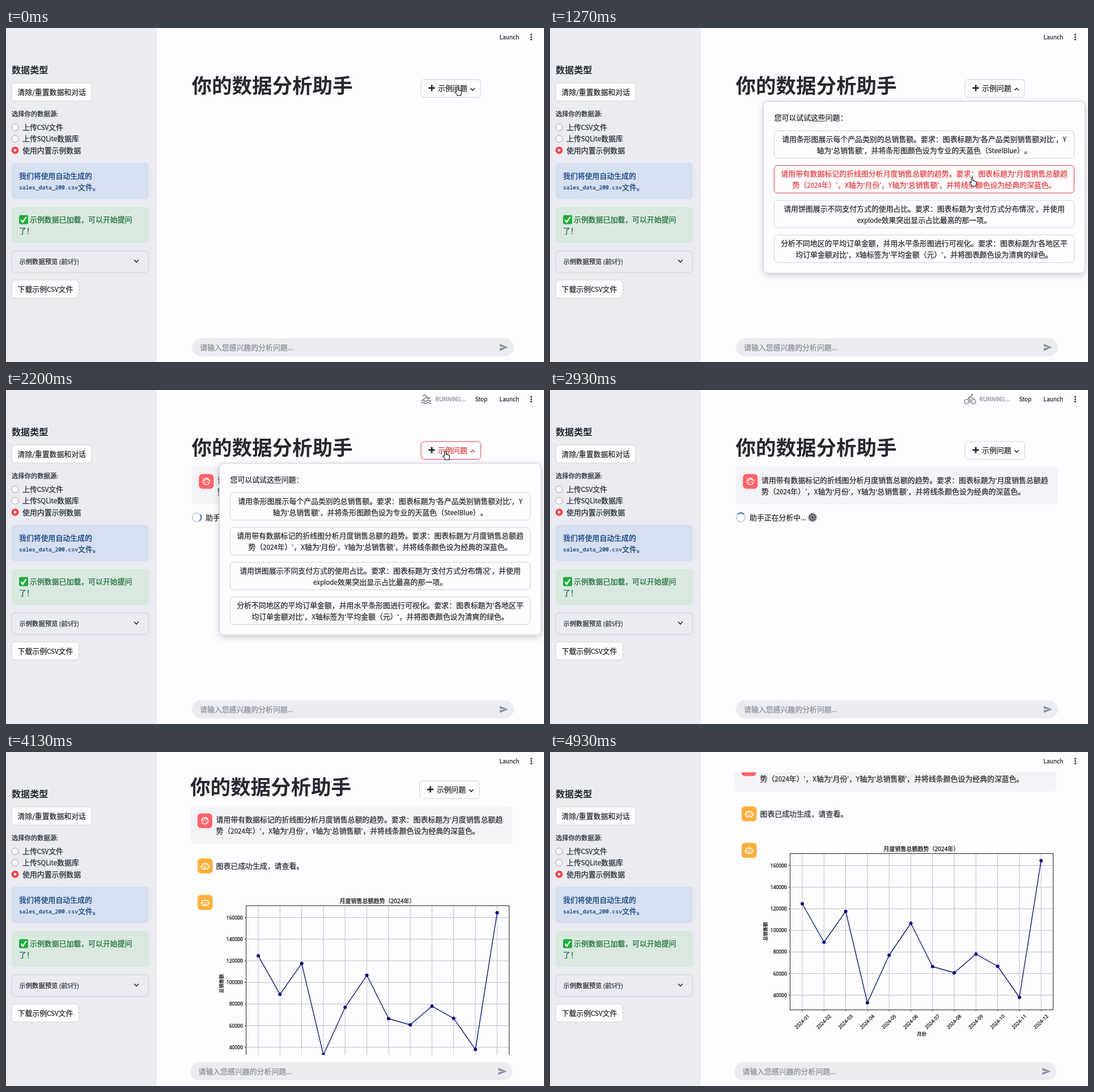
An HTML page for the animation above (4.99 s loop, 949x590 px).

```html
<!DOCTYPE html>
<html lang="zh-CN">
<head>
<meta charset="utf-8">
<style>
html, body { margin: 0; width: 100%; height: 100%; overflow: hidden; background: #fdfcff; }
svg { display: block; width: 949px; height: 590px; color: #262832; }
text {
  font-family: "Noto Sans CJK SC", "Noto Sans CJK", "Noto Sans", sans-serif;
  text-spacing-trim: space-all;
  fill: currentColor; stroke: currentColor; stroke-width: .25;
}
.bold { font-weight: 700; stroke: none; }
.latin { font-size: .89em; }
.quote { font-family: "Liberation Sans", sans-serif; }
.code { font-family: "Noto Sans Mono", "DejaVu Sans Mono", monospace; }
.plot { color: #111; }
.plot text { font-family: "Noto Sans", "Noto Sans CJK SC", sans-serif; }
.btn { fill: #fdfcff; stroke: #d1d0d8; }
.chev { fill: none; stroke: #262832; stroke-width: 1.6; }
.hot .btn { stroke: #e23c3f; }
.hot .ink { color: #e23c3f; }
.hot .chev { stroke: #e23c3f; }
.popup { filter: drop-shadow(0 3px 6px #0003); }
</style>
</head>
<body>
<svg id="stage" viewBox="0 0 949 590"></svg>
<script>
const LOOP = 4990, STEP = 1000 / 15, BASE = 12.9, SMALL = 11.3;
const INK = '#262832', PAGE = '#fdfcff', PANEL = '#ebecf2', MUTED = '#8b8c98';

const rich = s => s.replace(/[!-~]+|[‘’]/g,
  m => `<tspan class="${/[‘’]/.test(m) ? 'quote' : 'latin'}">${m}</tspan>`);
// y is the optical middle of the line
const text = (s, x, y, size = BASE, attrs = '') =>
  `<text x="${x}" y="${y + size * .37}" font-size="${size}" ${attrs}>${rich(s)}</text>`;
const label = (s, x, y, size, attrs = '') =>
  `<text x="${x}" y="${y + size * .36}" font-size="${size}" text-anchor="middle" ${attrs}>${s}</text>`;
const box = (x, y, w, h, attrs, r = 6) =>
  `<rect x="${x}" y="${y}" width="${w}" height="${h}" rx="${r}" ${attrs}/>`;
const dot = (x, y, r, attrs) => `<circle cx="${x}" cy="${y}" r="${r}" ${attrs}/>`;
const path = (d, attrs) => `<path d="${d}" ${attrs}/>`;
const group = (id, body, attrs = '') => `<g id="${id}" ${attrs}>${body}</g>`;

const prompts = [
  ['请用条形图展示每个产品类别的总销售额。要求：图表标题为‘各产品类别销售额对比’，Y',
   '轴为‘总销售额’，并将条形图颜色设为专业的天蓝色（SteelBlue）。'],
  ['请用带有数据标记的折线图分析月度销售总额的趋势。要求：图表标题为‘月度销售总额趋',
   '势（2024年）’，X轴为‘月份’，Y轴为‘总销售额’，并将线条颜色设为经典的深蓝色。'],
  ['请用饼图展示不同支付方式的使用占比。要求：图表标题为‘支付方式分布情况’，并使用',
   'explode效果突出显示占比最高的那一项。'],
  ['分析不同地区的平均订单金额，并用水平条形图进行可视化。要求：图表标题为‘各地区平',
   '均订单金额对比’，X轴标签为‘平均金额（元）’，并将图表颜色设为清爽的绿色。']
];
const itemTop = i => 181.5 + i * 61.4;

function sidebar() {
  const radios = ['上传CSV文件', '上传SQLite数据库', '使用内置示例数据'].map((s, i) => {
    const y = 175.5 + i * 20.2;
    const mark = i == 2 ? dot(16, y, 6.5, 'fill="#fa4545"') + dot(16, y, 2.4, 'fill="#fff"')
                        : dot(16, y, 6, 'fill="#f8f7fb" stroke="#a9a9b2"');
    return mark + text(s, 29, y);
  }).join('');
  const blue = 'color="#0b3b78"', green = 'color="#186b34"';
  return box(0, 0, 266, 590, `fill="${PANEL}"`, 0) +
    text('数据类型', 10, 74, 16.1, 'class="bold"') +
    box(10, 97, 141, 32, 'class="btn"') + text('清除/重置数据和对话', 20.5, 113) +
    text('选择你的数据源:', 10, 152, SMALL) + radios +
    box(9.5, 238, 242.5, 64.5, 'fill="#d6e0f1"') +
    text('我们将使用自动生成的', 23, 261, BASE, blue) +
    `<text class="code" x="23" y="285" font-size="9.65" ${blue}>sales_data_200.csv</text>` +
    text('文件。', 127, 281, BASE, blue) +
    box(9.5, 316, 242.5, 64, 'fill="#d9e9e0"') +
    box(23, 330.5, 16, 16, 'fill="#1fae3a"', 2.5) +
    path('M26.5 339l3 4 6-9', 'fill="none" stroke="#fff" stroke-width="2.4"') +
    text('示例数据已加载，可以开始提问', 42, 338.5, BASE, green) + text('了！', 23, 358, BASE, green) +
    box(10, 393.5, 241.5, 38.5, 'fill="none" stroke="#cfcfd8"') +
    text('示例数据预览 (前5行)', 23.5, 412.5, SMALL) +
    path('M226 409.5l4 4 4-4', 'class="chev"') +
    box(10, 445, 118.5, 32, 'class="btn"') + text('下载示例CSV文件', 20.5, 461);
}

const robot = y => `<g transform="translate(338 ${y})">` +
  box(0, 0, 26.5, 26.5, 'fill="#ffb03b"') +
  box(7.7, 9.7, 11, 9, 'fill="none" stroke="#fff" stroke-width="1.4"', 2) +
  path('M13.2 9.5V7M6 13v3M20.4 13v3M10.8 16.4h4.8', 'stroke="#fff" stroke-width="1.4"') +
  dot(11, 13.2, 1, 'fill="#fff"') + dot(15.4, 13.2, 1, 'fill="#fff"') + '</g>';

function chart() {
  const L = 423.5, R = 887.5, T = 179.5, B = 455.5;
  const values = [268, 336, 281.5, 443, 359, 302.5, 379, 390, 357, 378.5, 433.5, 192];
  const px = i => 445 + i * 38.3;
  let grid = '', ticks = '', labels = '';
  values.forEach((_, i) => {
    const x = px(i);
    grid += `M${x} ${T}V${B}`;
    ticks += `M${x} ${B}v3`;
    labels += label('2024-' + String(i + 1).padStart(2, 0), 0, 0, 8.6,
      `transform="translate(${x - .5} 476.5) rotate(-45)"`);
  });
  for (let v = 40000; v <= 160000; v += 20000) {
    const y = 429.6 - (v - 40000) / 20000 * 38.18;
    grid += `M${L} ${y}H${R}`;
    ticks += `M${L} ${y}h-3`;
    labels += `<text x="418" y="${y + 3.1}" font-size="8.5" text-anchor="end">${v}</text>`;
  }
  return `<g class="plot">` +
    path(grid, 'stroke="#b0b0b6" stroke-width=".8"') +
    path(ticks, 'stroke="#222" stroke-width=".8"') +
    path('M' + values.map((y, i) => px(i) + ' ' + y).join('L'),
      'fill="none" stroke="#0c1a72" stroke-width="1.4" stroke-linejoin="round"') +
    values.map((y, i) => dot(px(i), y, 3, 'fill="#00007f"')).join('') +
    box(L, T, R - L, B - T, 'fill="none" stroke="#222" stroke-width="1"', 0) + labels +
    label('月度销售总额趋势（2024年）', 655, 171, 10) + label('月份', 655.5, 498.5, 8.3) +
    label('总销售额', 0, 0, 8.3, 'transform="translate(380 317) rotate(-90)"') + '</g>';
}

function gear(x, y) {
  return dot(x, y, 6.6, 'fill="none" stroke="#4f5660" stroke-width="2.4" stroke-dasharray="2.1 1.36"') +
    dot(x, y, 5, 'fill="#9299a2" stroke="#535a64" stroke-width="2"') + dot(x, y, 2, 'fill="#3d434c"');
}

const message =
  box(328, 136, 567.5, 66, 'fill="#f4f4f8"') +
  box(340.3, 148.5, 26, 26, 'fill="#ff6267"') +
  dot(353.3, 161.3, 5.8, 'fill="none" stroke="#fff" stroke-width="1.4"') +
  path('M347.8 160q4 0 5.6-3.6 1.8 2.8 5.6 2.6', 'fill="none" stroke="#fff" stroke-width="1.4"') +
  dot(351.2, 162.6, .9, 'fill="#fff"') + dot(355.6, 162.6, .9, 'fill="#fff"') +
  text(prompts[1][0], 373, 159) + text(prompts[1][1], 373, 179);

const spinner =
  dot(336.5, 225, 7.8, 'fill="none" stroke="#d3d4db" stroke-width="2.2"') +
  path('M336.5 217.2a7.8 7.8 0 0 1 7.8 7.8', 'id="arc" fill="none" stroke="#3c7fc2" stroke-width="2.2"') +
  text('助手正在分析中...', 352, 225) + gear(463, 225);

const menuButton =
  box(732, 91, 105.5, 31.5, 'class="btn"') +
  path('M745.5 106H756.5M751 100.5V111.5', `stroke="${INK}" stroke-width="2.8"`) +
  text('示例问题', 762, 106.5, BASE, 'class="ink"') +
  path('', 'id="chev" class="chev"');

const popup =
  box(376.5, 129.5, 567, 303.5, 'class="btn popup"', 8) + text('您可以试试这些问题：', 395.5, 158) +
  prompts.map((lines, i) => group('item' + i,
    box(395.5, itemTop(i), 529, 48.5, 'class="btn"') +
    lines.map((s, k) => text(s, 660, itemTop(i) + 14.5 + k * 20, BASE, 'class="ink" text-anchor="middle"')).join('')
  )).join('');

const sports = [
  dot(746, 14.5, 2, `fill="${MUTED}" stroke="none"`) +
    path('M735 10l5-1 4 6M743 12l-7 5M733 19q2.3-2 4.6 0t4.6 0 4.6 0 2.4-.5M733 23q2.3-2 4.6 0t4.6 0 4.6 0 2.4-.5', ''),
  dot(743, 9, 2, `fill="${MUTED}" stroke="none"`) + path('M735 14l3-2.5 4 .5 2 3 3 .5M741 13l-2 4 4 2-1 5M739 17l-2 3h-4', ''),
  dot(735, 20.5, 4, '') + dot(747, 20.5, 4, '') + dot(744.5, 8.5, 1.8, `fill="${MUTED}" stroke="none"`) +
    path('M741 21v-4l-3-2.5 4-3.5 3 3.5h3', '')
];

stage.innerHTML =
  group('content',
    text('你的数据分析助手', 327.5, 101.5, 35.5, 'class="bold"') +
    group('msg', message) + group('wait', spinner) + group('menu', menuButton)) +
  group('result', robot(96) + text('图表已成功生成，请查看。', 370.5, 109.5) + robot(160.5) + chart()) +
  box(266, 0, 683, 36, `fill="${PAGE}"`, 0) +
  box(266, 535, 683, 55, `fill="${PAGE}"`, 0) +
  group('prompt',
    box(328, 548, 567.5, 32, `fill="${PANEL}"`, 16) +
    text('请输入您感兴趣的分析问题...', 342, 564, BASE, `color="${MUTED}"`) +
    path('M871 558l15 6.2-15 6.2v-4.8l9-1.4-9-1.4z', 'fill="#8d93a6"')) +
  group('status',
    sports.map((s, i) => group('sport' + i, s,
      `fill="none" stroke="${MUTED}" stroke-width="1.7" stroke-linecap="round"`)).join('') +
    text('RUNNING...', 757.5, 16, SMALL, `color="${MUTED}"`) + text('Stop', 827.5, 16, SMALL)) +
  text('Launch', 870.5, 16, SMALL) +
  [11.8, 16, 20.2].map(y => dot(926.5, y, 1.5, `fill="${INK}"`)).join('') +
  sidebar() + group('pop', popup) +
  group('cursor',
    path('M-1.4 9V1.2a1.4 1.4 0 0 1 2.8 0V6q1.6-1 2.2.4 1.6-.6 2.1.6 1.8-.2 1.8 1.5V11q0 2-1.3 3.6v.9H.2Q-.8 13-4 9.5q-.3-1.8 1.2-1.4z',
      'id="hand" fill="#fff" stroke="#111" stroke-width="1.1" stroke-linejoin="round"') +
    path('M0 0V13l3-2.8 2 4.6 2-.9-2-4.5h4z', 'id="arrow" fill="#111" stroke="#fff"'));

const $ = id => document.getElementById(id);
const show = (id, on) => $(id).style.display = on ? '' : 'none';
const move = (id, x, y) => $(id).setAttribute('transform', `translate(${x} ${y})`);
const ease = (t, a, b) => {
  const p = Math.min(1, Math.max(0, (t - a) / (b - a)));
  return p * p * (3 - 2 * p);
};

// time, x, y of the pointer tip
const route = [[0, 796, 104], [70, 796, 104], [530, 779, 104], [700, 779, 104], [1130, 744.5, 264],
  [1650, 744.5, 264], [2130, 775, 108], [2540, 775, 108], [2790, 805, -25]];

function pointer(t) {
  const i = route.findIndex(k => k[0] > t);
  if (i < 0) return [0, -99];
  const [a, b] = [route[i - 1], route[i]], p = ease(t, a[0], b[0]);
  return [1, 2].map(k => a[k] + (b[k] - a[k]) * p);
}

function draw(t) {
  const [x, y] = pointer(t);
  const open = t >= 265 && t < 2390, running = t >= 1390 && t < 3920, done = t >= 3920;
  const scroll = 132 * ease(t, 4057, 4266), shift = done ? -2.5 : 0;
  const onMenu = y > 91 && y < 122.5;
  let onItem = -1;
  prompts.forEach((_, i) => {
    const inside = open && y > itemTop(i) && y < itemTop(i) + 48.5;
    if (inside) onItem = i;
    $('item' + i).classList.toggle('hot', inside || i == 0 && t < 800);
  });

  move('content', shift, -scroll);
  move('result', 0, 132 - scroll);
  move('prompt', shift, 0);
  move('cursor', x, y);
  show('pop', open);
  show('msg', t >= 1460);
  show('wait', t >= 1460 && !done);
  show('status', running);
  show('result', done);
  show('hand', onMenu || onItem >= 0);
  show('arrow', !onMenu && onItem < 0);
  sports.forEach((_, i) => show('sport' + i, Math.floor(t / 365) % 3 == i));
  $('menu').classList.toggle('hot', onMenu && t >= 60);
  $('chev').setAttribute('d', open ? 'M819.5 110l3.7-3.7 3.7 3.7' : 'M819.5 106.3l3.7 3.7 3.7-3.7');
  $('arc').setAttribute('transform', `rotate(${t * .36 - 20} 336.5 225)`);
}

const start = performance.now();
function tick() {
  const t = (performance.now() - start) % LOOP;
  draw(Math.floor((t + 5) / STEP) * STEP);
  requestAnimationFrame(tick);
}
tick();
</script>
</body>
</html>
```
